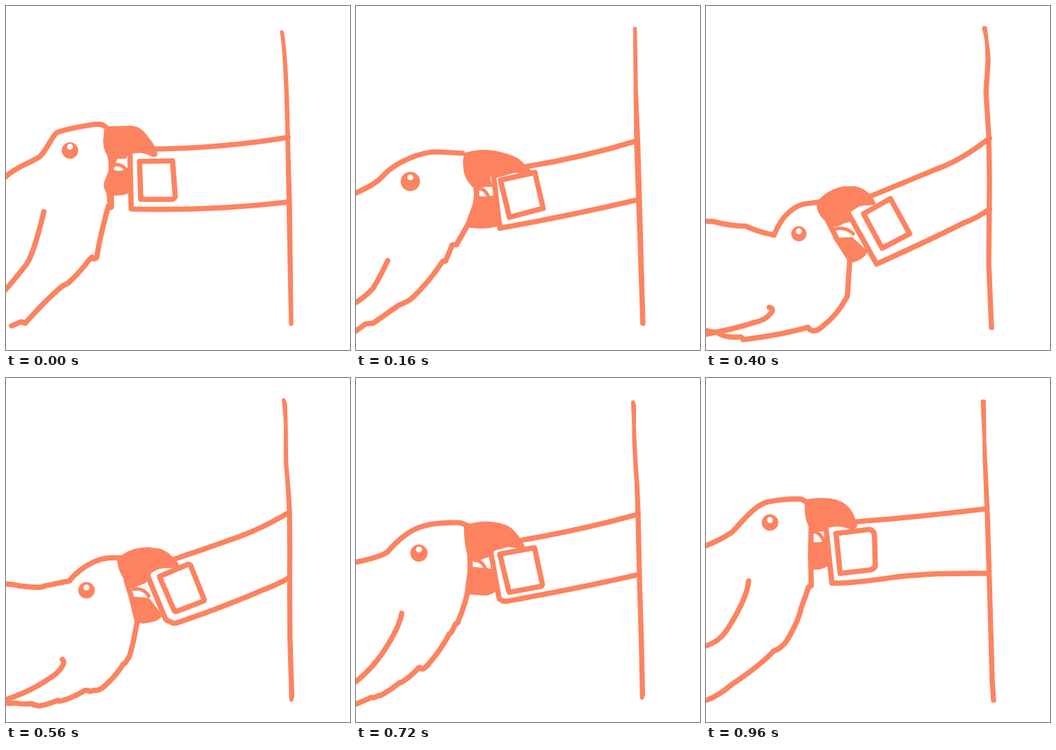
Animation of 500x500 px, one loop 1.04 s. Source, as an HTML page:

```html
<!DOCTYPE html>
<html lang="en">
<head>
<meta charset="utf-8">
<title>Parrot pulling a strap</title>
<style>
  html, body { margin: 0; width: 100%; height: 100%; overflow: hidden; background: #fff; }
  svg { display: block; width: 100%; height: 100%; }
  path { fill: none; stroke: #fd8360; stroke-width: 7.7; stroke-linecap: round; stroke-linejoin: round; }
  .lower, .upper, .eye { fill: #fd8360; stroke-width: 2; }
  .wall { fill: #fd8360; stroke-width: 5.5; }
  .tongue { stroke-width: 5; }
  .band { fill: #fff; }
  .glint { fill: #fff; stroke: none; }
</style>
</head>
<body>
<svg viewBox="0 0 500 500"></svg>
<script>
const NS = 'http://www.w3.org/2000/svg';
const STEP = 80;
const SAMPLES = 120;
const PARTS = ['head', 'wing', 'chest', 'lower', 'tongue', 'band', 'box', 'upper', 'wall', 'eye', 'glint'];

const disc = (x, y, r) => `M${x - r} ${y}a${r} ${r} 0 1 1 ${2 * r} 0a${r} ${r} 0 1 1 ${-2 * r} 0Z`;
const eyeAt = (x, y, r, lift) => ({ eye: disc(x, y, r - 1), glint: disc(x, y - lift, 4.3) });

const high = {
  ...eyeAt(93, 210, 12, 5.5),
  head: 'M-5 252C15 233 36 228 49 219C60 209 66 190 74 184C90 178 115 174 128 172Q140 171 144 175',
  wing: 'M55 299C50 320 40 360 30 375Q15 395 -5 417',
  chest: 'M153 225L152 293L149 290C142 315 135 345 132 365Q128 370 125 365L120 370Q105 390 90 403L82 407Q60 425 28 461L22 459L8 465',
  lower: 'M152 234L158 240Q170 242 176 236L180 270Q170 276 156 274L156 293Q152 298 149 294L147 272Q141 262 144 255Z',
  tongue: 'M157 231Q168 228 176 240',
  band: 'M410 191Q320 206 216 208L180 211L182 295Q300 298 410 285',
  box: 'M194 226L242 225L246 277Q244 281 240 281L196 281Z',
  upper: 'M144 176L182 175C200 177 202 188 210 196Q219 208 219 217Q215 220 210 217Q200 211 178 211L174 221L161 221L157 234L151 232L148 217Q140 205 143 187Z',
  wall: 'M401 38Q408 75 410 190L413 290L415 462L414 462L412 370L409 200Q407 75 401 38Z'
};

const tilt = {
  ...eyeAt(79, 255, 14, 6),
  head: 'M-5 274C15 265 30 258 42 244C60 226 95 212 117 212L155 214',
  wing: 'M46 370Q36 392 25 410Q14 423 -5 434',
  chest: 'M172 256Q178 270 173 290L163 317Q150 340 146 347L140 347L130 371L126 371Q105 403 80 426Q70 432 62 435L25 461L14 462L-5 476',
  lower: 'M175 276Q188 280 200 276L210 318Q190 324 175 322Q162 322 160 318Q172 295 173 278Z',
  tongue: 'M178 266Q187 264 193 278',
  band: 'M408 196Q330 220 250 233L200 247L209 323Q310 305 408 282',
  box: 'M210 253L260 242L272 294L223 307Z',
  upper: 'M160 214Q180 208 200 211Q225 216 236 223Q247 232 258 244Q250 243 240 243Q220 238 200 243Q192 246 195 254L197 262L188 262L172 264Q158 252 157 235Q155 220 160 214Z',
  wall: 'M405.5 33L407 120L410.5 200L413 285L418 462L416 462L410 285L407 200Z'
};

const level = {
  ...eyeAt(99, 286, 13, 4.5),
  head: 'M-5 285Q25 291 51 288C70 266 90 252 103 248Q130 238 152 236L166 238',
  wing: 'M57 402Q50 420 40 428Q25 445 -5 455',
  chest: 'M174 280L177 305L173 338Q162 375 150 392L148 396L144 395Q130 420 106 441L101 443L102 438L97 437Q90 447 76 456L66 460L67 456Q55 465 38 470L34 470L37 465L-5 475',
  lower: 'M175 300Q190 300 204 305L220 334Q210 342 195 340L172 340L174 320Z',
  tongue: 'M183 290Q196 288 201 303',
  band: 'M412 198Q340 229 250 251L204 267L225 343Q330 320 412 285',
  box: 'M217 275L266 260L281 316L235 328Z',
  upper: 'M163 236L172 236Q185 229 200 230Q225 231 236 238Q248 247 258 262L245 262Q225 260 204 268L206 278Q198 280 190 285L178 290L174 285Q165 260 163 236Z',
  wall: 'M403 32L403 80Q405 110 409 140Q413 170 414 200L414 300L417 468L415 468L412 300L412 200Q411 165 409 140Q405 110 404 80L405 32Z'
};

const low = {
  ...eyeAt(135, 331, 11, 3.5),
  head: 'M-5 313L10 313Q35 320 58 320Q75 328 99 333C110 304 130 288 148 287L165 285',
  wing: 'M92 438Q101 440 92 449Q85 457 70 460Q40 470 -5 478',
  chest: 'M176 310L190 338L209 368L206 415Q206 424 203 426Q190 450 170 465Q160 475 152 471L148 467Q110 478 54 485L51 481Q28 483 17 475L-5 471',
  lower: 'M186 338L212 337L234 357Q228 368 213 372Q206 368 200 358Z',
  tongue: 'M188 324Q204 321 214 331',
  band: 'M412 192Q370 225 335 237Q270 264 238 277L205 298L248 375Q330 338 375 315Q395 308 412 295',
  box: 'M229 302L268 280L296 331L256 352Z',
  upper: 'M162 285Q178 267 200 263L217 263Q238 268 246 288L230 289Q212 291 204 299L208 313L200 315L190 320Q180 320 174 312Q160 300 162 285Z',
  wall: 'M404 32Q410 55 411 80L408 125L412 190L413 250L412 375L416 468L414 468L410 375L411 250L410 190L406 125L409 80Q409 55 406 32Z'
};

const back = { ...level, wing: 'M72 380C72 395 55 415 40 430Q22 447 -5 460' };

const rise = {
  ...eyeAt(84, 223, 12, 6),
  head: 'M-5 252Q20 237 35 225Q55 198 78 187Q100 179 115 181L150 185L158 191',
  wing: 'M61 304C50 340 30 395 -5 430',
  chest: 'M157 235Q156 255 153 270Q150 300 140 325L138 333L134 331Q124 362 95 402L90 408L88 402Q70 420 30 457L22 463L20 460Q10 468 -5 477',
  lower: 'M158 250Q175 254 188 250L191 278Q185 290 170 290L151 287Q145 275 150 262Z',
  tongue: 'M162 240Q172 242 176 254',
  band: 'M408 198Q310 212 228 221L187 231L194 309Q300 293 410 286',
  box: 'M201 237L253 233L262 289L210 295Z',
  upper: 'M153 189L180 189Q205 190 216 201Q227 214 231 229Q222 232 215 229Q195 225 188 230L187 240Q178 240 172 243L162 243L153 235Q149 215 153 189Z',
  wall: 'M402 38L406 80L408 200L412 290L416 380L418 462L416 462L414 380L410 290L406 200L404 80L404 38Z'
};

const close = {
  ...eyeAt(93, 210, 12, 3.5),
  head: 'M-5 246Q20 236 38 224C60 200 72 185 90 180Q115 175 138 176L148 181',
  wing: 'M62 295Q60 320 30 367Q18 385 -5 391',
  chest: 'M153 215L152 255L153 302L149 304Q142 325 138 335Q135 352 118 381Q110 393 98 397Q80 417 38 445Q15 465 -5 470',
  lower: 'M152 239Q163 241 175 238L180 270Q168 280 152 277L149 262Z',
  tongue: 'M156 223Q166 224 172 238',
  band: 'M408 190Q310 202 217 209L174 214L183 298Q210 299 270 290Q320 283 410 284',
  box: 'M189 226L238 220Q245 222 245 230L246 274Q244 278 238 279L195 284Z',
  upper: 'M145 178Q160 174 180 176Q198 178 208 190Q216 200 219 215Q215 220 210 219Q195 213 177 215L172 222L154 222Q142 205 145 178Z',
  wall: 'M402 34L406 120L410 200L413 300L417 440L419 469L417 469L415 440L411 300L408 200L405 120L404 34Z'
};

const poses = [high, tilt, level, low, back, rise, close];
// Fractions lie between two neighbouring poses.
const timeline = [0, .5, 1, 2, 2.5, 3, 3.1, 3.5, 4, 4.5, 5, 5.5, 6];

const probe = document.createElementNS(NS, 'path');

function sample(d) {
  probe.setAttribute('d', d);
  const length = probe.getTotalLength();
  return Array.from({ length: SAMPLES + 1 }, (_, i) => probe.getPointAtLength(length * i / SAMPLES));
}

function blend(a, b, k) {
  const to = sample(b);
  const points = sample(a).map((p, i) =>
    `${(p.x + (to[i].x - p.x) * k).toFixed(2)} ${(p.y + (to[i].y - p.y) * k).toFixed(2)}`);
  return 'M' + points.join('L') + (a.endsWith('Z') ? 'Z' : '');
}

function poseAt(n) {
  const i = Math.floor(n), k = n - i;
  if (!k) return poses[i];
  return Object.fromEntries(PARTS.map(part => [part, blend(poses[i][part], poses[i + 1][part], k)]));
}

const svg = document.querySelector('svg');
const paths = PARTS.map(part => {
  const path = document.createElementNS(NS, 'path');
  path.setAttribute('class', part);
  return svg.appendChild(path);
});
const drawings = timeline.map(poseAt);

let shown = -1;
function draw(now) {
  const index = Math.floor(now / STEP) % drawings.length;
  if (index !== shown) {
    PARTS.forEach((part, i) => paths[i].setAttribute('d', drawings[index][part]));
    shown = index;
  }
  requestAnimationFrame(draw);
}
draw(0);
</script>
</body>
</html>
```
